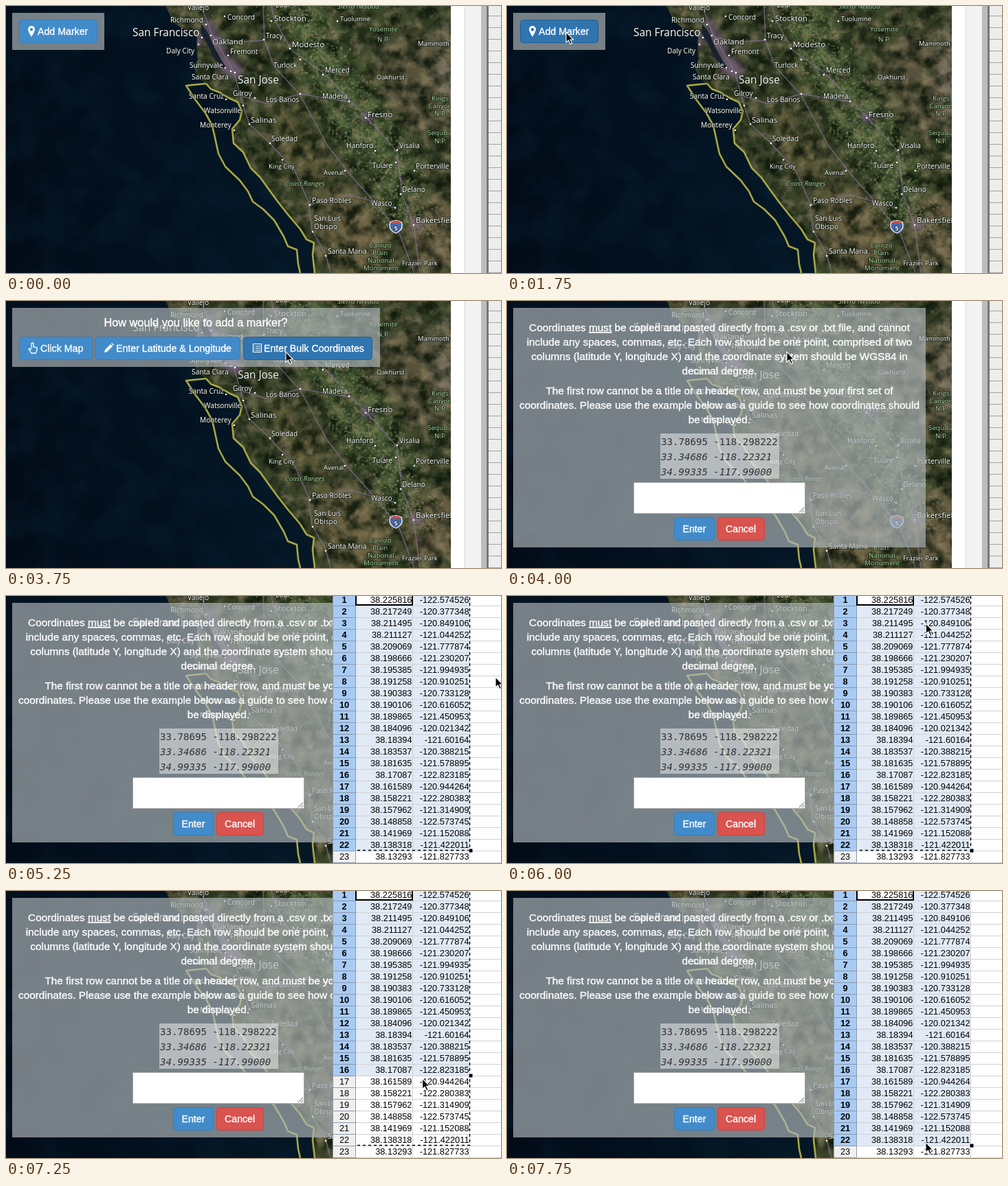
These frames come from a looping animation (720 by 389 pixels, 8000 ms). An HTML page:

```html
<!DOCTYPE html>
<html lang="en">
<head>
<meta charset="utf-8">
<style>
html, body { margin: 0; width: 100%; height: 100%; overflow: hidden; background: #fff; }
svg { display: block; width: 720px; height: 389px; }
text { white-space: pre; }
.map text { font-family: "Open Sans", "Noto Sans", sans-serif; fill: #fff; stroke: #10180fb0; stroke-width: 1.6px; paint-order: stroke; }
.map .park { fill: #a9d8a2; font-style: italic; }
.map .green { fill: #a9d8a2; }
.ui text { font-family: "Liberation Sans", Arial, sans-serif; font-size: 14.2px; fill: #fff; stroke: #fff; stroke-width: .35px; }
.ui .copy text { font-size: 15.33px; text-anchor: middle; }
.ui .code text { font: 14.1px "DejaVu Sans Mono", monospace; fill: #333; stroke: none; }
.sheet text { font: 12.8px "Liberation Sans", Arial, sans-serif; fill: #000; text-anchor: end; }
.sheet .num { text-anchor: middle; }
.panel { fill: #afb5b8; fill-opacity: .68; }
.btn { fill: #428bca; stroke: #357ebd; }
.btn.down { fill: #3074b0; stroke: #285e8e; }
.btn.red { fill: #d9534f; stroke: #d43f3a; }
</style>
</head>
<body>
<svg id="stage" viewBox="0 0 720 389"></svg>
<script>
const $ = id => document.getElementById(id);
const rect = (x, y, w, h, attrs = '') => `<rect x="${x}" y="${y}" width="${w}" height="${h}" ${attrs}/>`;
const path = (d, attrs = '') => `<path d="${d}" ${attrs}/>`;
const text = (x, y, s, attrs = '') => `<text x="${x}" y="${y}" ${attrs}>${s}</text>`;
const range = (n, fn) => Array.from({ length: n }, (_, i) => fn(i)).join('');

let seed = 11;
const random = () => (seed = (seed * 16807) % 2147483647) / 2147483647;

// Map
const coast = 'M232 0L238 12L243 24L254 31L270 38L278 46L277 62L279 78L274 92L281 106L291 113L298 121L311 126L324 134L337 140L343 153L340 166L329 179L331 200L345 213L356 236L370 250L385 271L396 286L411 305L428 325L437 340L448 345';
const land = coast + 'L446 362L449 389H647V0Z';
const sanctuary = 'M291 113L262 116L275 136L290 156L300 174L304 192L309 215L319 234L340 254L352 270L359 285L374 296L390 312L404 336L410 350L423 355L425 376L428 389';

const cities = {
  15.4: `184 44 San Francisco
337 113 San Jose`,
  11.5: `390 22 Stockton
416 60 Modesto
300 56 Oakland
356 170 Salinas
526 162 Fresno
596 316 Bakersfield`,
  10.2: `264 6 Vallejo
239 24 Richmond
322 20 Concord
378 47 Tracy
233 69 Daly City
326 70 Fremont
267 90 Sunnyvale
270 107 Santa Clara
389 90 Turlock
464 97 Merced
266 135 Santa Cruz
330 131 Gilroy
378 140 Los Banos
460 135 Madera
288 156 Watsonville
282 177 Monterey
386 197 Soledad
495 207 Hanford
572 207 Visalia
533 236 Tulare
596 237 Porterville
576 271 Delano
531 291 Wasco
445 287 Paso Robles
448 313 San Luis
448 325 Obispo
468 361 Santa Maria
392 2 Lodi`,
  9.4: `486 22 Tuolumne
599 58 Mammoth
539 107 Oakhurst
382 237 King City
462 246 Avenal
576 378 Frazier Park`
};
const parks = `482 4 park Sierra Nevada
406 262 park Coast Ranges
528 37 green Yosemite
540 52 green N.P.
619 138 green Kings
614 149 green Canyon
623 160 green N.P.
613 188 green Sequoia
623 200 green N.P.
528 352 green Carrizo
533 363 green Plain
526 374 green National
520 385 green Monument`;
const dots = [[318, 15], [386, 22], [413, 62], [375, 49], [291, 27], [285, 46], [298, 43], [280, 56], [323, 72],
  [319, 90], [327, 95], [333, 97], [428, 78], [461, 100], [362, 134], [428, 128], [499, 139], [523, 163], [320, 136],
  [345, 145], [354, 172], [332, 181], [384, 200], [402, 224], [537, 211], [569, 210], [567, 228], [594, 240],
  [574, 274], [566, 294], [442, 290], [446, 329], [465, 364], [593, 319], [493, 240], [482, 22]];

const lines = s => s.split('\n').map(l => l.split(' '));
const cityLabels = Object.entries(cities).map(([size, list]) =>
  lines(list).map(([x, y, ...name]) => text(x, y, name.join(' '), `font-size="${size}"`)).join('')).join('');
const parkLabels = lines(parks).map(([x, y, kind, ...name]) =>
  text(x, y, name.join(' '), `class="${kind}" font-size="9.8"`)).join('');

function farms(color, count) {
  let d = '';
  for (let i = 0; i < count; i++) {
    const y = random() * 330, x = 418 + y * .56 + (random() + random() - 1) * 58;
    const w = 1 + random() * 3, h = 1 + random() * 3;
    d += `M${x.toFixed(1)} ${y.toFixed(1)}h${w.toFixed(1)}v${h.toFixed(1)}h-${w.toFixed(1)}z`;
  }
  return path(d, `fill="${color}" opacity=".55"`);
}

const noise = (id, freq, n, rgb, alpha) => `<filter id="${id}" x="0" y="0" width="1" height="1" color-interpolation-filters="sRGB">
  <feTurbulence type="fractalNoise" baseFrequency="${freq}" numOctaves="5" seed="${n}"/>
  <feColorMatrix values="0 0 0 0 ${rgb[0]} 0 0 0 0 ${rgb[1]} 0 0 0 0 ${rgb[2]} ${alpha}"/></filter>`;
const blob = (x, y, rx, ry, color, turn = 0) =>
  `<ellipse rx="${rx}" ry="${ry}" fill="${color}" transform="translate(${x} ${y}) rotate(${turn})"/>`;

const map = `<defs>
  ${noise('dark', '.045', 7, [.04, .08, .03], '2.8 0 0 0 -1.05')}
  ${noise('light', '.06', 4, [.62, .56, .42], '0 2.4 0 0 -1.08')}
  ${noise('swell', '.02', 9, [.05, .17, .25], '0 0 1.6 0 -.6')}
  <filter id="soft"><feGaussianBlur stdDeviation="12"/></filter>
  <filter id="haze"><feGaussianBlur stdDeviation="4"/></filter>
  <linearGradient id="sea"><stop stop-color="#020c18"/><stop offset=".4" stop-color="#03111f"/><stop offset="1" stop-color="#071f2f"/></linearGradient>
  <clipPath id="land">${path(land)}</clipPath>
  <clipPath id="frame">${rect(0, 0, 647, 389)}</clipPath>
</defs>
<g class="map" clip-path="url(#frame)">
  ${rect(0, 0, 647, 389, 'fill="url(#sea)"')}
  ${rect(0, 0, 480, 389, 'filter="url(#swell)" opacity=".45"')}
  <g clip-path="url(#land)">
    ${rect(230, 0, 417, 389, 'fill="#394329"')}
    <g filter="url(#soft)">
      ${blob(505, 150, 42, 210, '#495b35', -29)}
      ${blob(600, 110, 50, 90, '#55513a', -25)}
      ${blob(650, 90, 24, 70, '#77705f')}
      ${blob(545, 15, 60, 40, '#3b4529')}
      ${blob(505, 330, 45, 70, '#675f41', -30)}
      ${blob(625, 330, 45, 55, '#6b5f45')}
      ${blob(425, 205, 22, 80, '#565436', -32)}
    </g>
    ${rect(230, 0, 417, 389, 'filter="url(#dark)" opacity=".85"')}
    ${rect(230, 0, 417, 389, 'filter="url(#light)" opacity=".6"')}
    ${farms('#6f8653', 750)}${farms('#294027', 650)}${farms('#8a8667', 380)}
    <g filter="url(#haze)" opacity=".75">
      ${blob(305, 50, 8, 38, '#76617b', -25)}
      ${blob(326, 90, 20, 13, '#7c6482', 30)}
      ${blob(281, 48, 6, 14, '#76617b')}
      ${blob(525, 163, 9, 8, '#76617b')}
      ${blob(598, 318, 10, 7, '#76617b')}
    </g>
    ${path('M284 26L293 38L302 58L312 77L322 92L313 89L300 71L290 50L283 39Z', 'fill="#17212f"')}
    <g fill="none" stroke="#8b75a0" stroke-width="1.4" opacity=".7" stroke-linejoin="round">
      ${path('M284 0L299 40L314 66L331 95L345 145L354 172L384 200L420 240L440 285L445 326L465 362L472 389')}
      ${path('M386 0L390 18L415 64L464 99L524 162L569 212L576 274L593 320L602 389')}
      ${path('M374 0L376 50L390 88L428 130L468 204L500 245L540 290L572 331L594 389')}
      ${path('M300 46L340 52L376 50M340 130L378 142L428 128L500 140M440 290L500 275L566 294')}
    </g>
  </g>
  <g fill="none" stroke="#a7a844" stroke-width="2.6" stroke-linejoin="round">
    ${path(sanctuary)}
    ${path('M291 113L298 121L311 126L324 134L337 140L343 153L340 166L329 179L331 200L345 213L356 236L370 250L385 271L396 286L411 305L428 325L437 340L448 345L446 362L449 389')}
  </g>
  ${path(dots.map(p => `M${p}h0`).join(''), 'stroke="#fff" stroke-width="2.6" stroke-linecap="round"')}
  ${path('M559 315Q567 310 575 315Q579 326 567 331Q555 326 559 315Z', 'fill="#4767ab" stroke="#fff" stroke-width="1.2"')}
  ${path('M560 315Q567 311 574 315V317H560Z', 'fill="#c4504e"')}
  ${text(567, 327, '5', 'font-size="9" font-weight="bold" text-anchor="middle"')}
  ${parkLabels}${cityLabels}
</g>`;

// Page edge and the window behind it
const edge = rect(647, 0, 73, 389, 'fill="#fff"') + rect(667, 0, 24, 389, 'fill="#f3f3f3"') +
  rect(667, 0, 1, 389, 'fill="#d8d8d8"') + rect(691, 0, 8, 389, 'fill="#bcbcbc"') +
  rect(699, 0, 3, 389, 'fill="#777"') + rect(702, 0, 18, 389, 'fill="#ededeb"') +
  path(range(23, i => `M702 ${14.5 + 17 * i}h18`), 'stroke="#a2a2a0"');

// Dialogs
const button = (x, y, w, h, label, labelX, attrs = 'class="btn"') =>
  rect(x + .5, y + .5, w - 1, h - 1, `rx="4" ${attrs}`) + text(labelX, y + h / 2 + 5, label);
const panel = (w, h) => rect(9, 10, w, h, 'class="panel"');
const copy = [[39, 'Coordinates <tspan text-decoration="underline">must</tspan> be copied and pasted directly from a .csv or .txt file, and cannot'],
  [60, 'include any spaces, commas, etc. Each row should be one point, comprised of two'],
  [81, 'columns (latitude Y, longitude X) and the coordinate system should be WGS84 in'],
  [102, 'decimal degree.'],
  [131, 'The first row cannot be a title or a header row, and must be your first set of'],
  [152, 'coordinates. Please use the example below as a guide to see how coordinates should'],
  [173, 'be displayed.']];

const dialogs = `<g class="ui">
  <g id="start">${panel(134, 54)}${button(19, 20, 114, 34, 'Add Marker', 46, 'class="btn" id="add"')}
    ${path('M37 29a5 5 0 0 1 5 5q0 3-5 11q-5-8-5-11a5 5 0 0 1 5-5zm0 3a2 2 0 0 0 0 4.400a2 2 0 0 0 0-4.400z', 'fill="#fff" fill-rule="evenodd"')}</g>
  <g id="choice">${panel(535, 86)}
    ${text(276, 37, 'How would you like to add a marker?', 'text-anchor="middle" style="font-size:16.3px"')}
    ${button(19, 52, 107, 34, 'Click Map', 50)}
    ${button(130, 52, 211, 34, 'Enter Latitude &amp; Longitude', 160)}
    ${button(345, 52, 188, 34, 'Enter Bulk Coordinates', 375, 'class="btn" id="bulk"')}
    ${path('M37 69V62q1.500-2 3 0V67l5 1v4l-2 4h-6l-4-6q1-2 4 1', 'fill="none" stroke="#fff" stroke-width="1.3"')}
    ${path('M143 75l1-4 8-8 3 3-8 8zM153 62l1-1 3 3-1 1z', 'fill="#fff"')}
    ${path('M359.500 62.500h12v12h-12zM361 66h1m1 0h7M361 69h1m1 0h7M361 72h1m1 0h7', 'fill="none" stroke="#fff" stroke-width="1.2"')}</g>
  <g id="bulkForm">${panel(600, 349)}
    <g class="copy">${copy.map(([y, s]) => text(309, y + 5, s)).join('')}</g>
    ${rect(223, 193, 173, 66, 'fill="#fff" opacity=".45"')}
    <g class="code">${text(224, 210, '33.78695 -118.298222')}
      <g font-style="italic">${text(224, 232, '33.34686 -118.22321', 'style="font-style:italic"')}${text(224, 254, '34.99335 -117.99000', 'style="font-style:italic"')}</g></g>
    ${rect(184.5, 264.5, 249, 45, 'fill="#fff" stroke="#a9a9a9"')}
    ${path('M425 308l7-7M429 308l3-3', 'stroke="#666"')}
    ${button(243, 315, 59, 34, 'Enter', 255.5)}
    ${button(306, 315, 69, 34, 'Cancel', 318, 'class="btn red"')}</g>
</g>`;

// Spreadsheet
const cells = [[38.225816, -122.574526], [38.217249, -120.377348], [38.211495, -120.849106], [38.211127, -121.044252],
  [38.209069, -121.777874], [38.198666, -121.230207], [38.195385, -121.994935], [38.191258, -120.910251],
  [38.190383, -120.733128], [38.190106, -120.616052], [38.189865, -121.450953], [38.184096, -120.021342],
  [38.18394, -121.60164], [38.183537, -120.388215], [38.181635, -121.578895], [38.17087, -122.823185],
  [38.161589, -120.944264], [38.158221, -122.280383], [38.157962, -121.314909], [38.148858, -122.573745],
  [38.141969, -121.152088], [38.138318, -121.422011], [38.13293, -121.827733]];
const rowBottom = n => 17 * n - 3;
const sheet = `<g class="sheet" id="sheet">
  ${rect(475, 0, 245, 389, 'fill="#fff"')}${rect(475, 0, 34, 389, 'fill="#f0f0f0"')}
  ${rect(475, 0, 34, 0, 'id="headFill" fill="#a9cbf3"')}${rect(509, 0, 165, 0, 'id="cellFill" fill="#e1eaf5"')}
  ${path(range(23, i => `M509 ${rowBottom(i + 1) + .5}H720`) + 'M591.500 0V389M674.500 0V389', 'stroke="#cfd2d6"')}
  ${path(range(23, i => `M475 ${rowBottom(i + 1) + .5}H509`) + 'M508.500 0V389M475.500 0V389', 'stroke="#8b98aa"')}
  ${rect(509, -4, 82, 17, 'fill="#fff" stroke="#000" stroke-width="2"')}
  ${cells.map(([lat, lon], i) => text(492, 17 * i + 10, i + 1, 'class="num"') +
    text(590.5, 17 * i + 10, lat) + text(673.5, 17 * i + 10, lon)).join('')}
  ${path('M674.500 0V370.500H509', 'id="ants" fill="none" stroke="#000" stroke-width="1.4" stroke-dasharray="4 4"')}
  ${rect(673, 0, 6, 6, 'id="handle" fill="#000" stroke="#fff"')}
</g>`;

const pointer = path('M0 0V15L3.500 12L6 17.500L8.500 16.500L6 11H10.500Z', 'id="pointer" fill="#000" stroke="#fff" stroke-width="1.1"');
$('stage').innerHTML = map + edge + dialogs + sheet + pointer;
const rowNumbers = document.querySelectorAll('.num');

// Pointer route: time, x, y
const route = [[750, 560, 260], [1000, 250, 110], [1250, 86, 38], [2500, 86, 38], [2750, 150, 48], [3500, 407, 74],
  [4250, 407, 74], [4500, 510, 90], [5000, 712, 118], [5250, 712, 118], [5500, 708, 108], [6250, 560, 6],
  [6750, 599, 88], [7500, 609, 366], [8000, 609, 366]];

function pointerAt(t) {
  const i = route.findIndex(key => key[0] > t);
  if (i < 1) return route[0].slice(1);
  const [t0, x0, y0] = route[i - 1], [t1, x1, y1] = route[i];
  const k = (t - t0) / (t1 - t0);
  return [x0 + (x1 - x0) * k, y0 + (y1 - y0) * k];
}

const show = (id, on) => $(id).style.display = on ? '' : 'none';

function draw(now) {
  const t = Math.floor(now % 8000 / 250) * 250;
  const [x, y] = pointerAt(t);
  const rows = t < 6250 ? 22 : Math.max(1, Math.round((y + 3) / 17));
  show('pointer', t >= 750);
  $('pointer').setAttribute('transform', `translate(${x} ${y})`);
  show('start', t < 2500);
  show('choice', t >= 2500 && t < 4000);
  show('bulkForm', t >= 4000);
  show('sheet', t >= 5250);
  $('add').classList.toggle('down', t >= 1750);
  $('bulk').classList.toggle('down', t >= 3750);
  $('headFill').setAttribute('height', rowBottom(rows));
  $('cellFill').setAttribute('height', rowBottom(rows));
  $('handle').setAttribute('y', rowBottom(rows) - 3);
  rowNumbers.forEach((n, i) => n.style.fontWeight = i < rows ? 'bold' : 'normal');
  show('ants', t < 7750);
  $('ants').setAttribute('stroke-dashoffset', -t / 125);
  requestAnimationFrame(draw);
}
requestAnimationFrame(draw);
</script>
</body>
</html>
```
